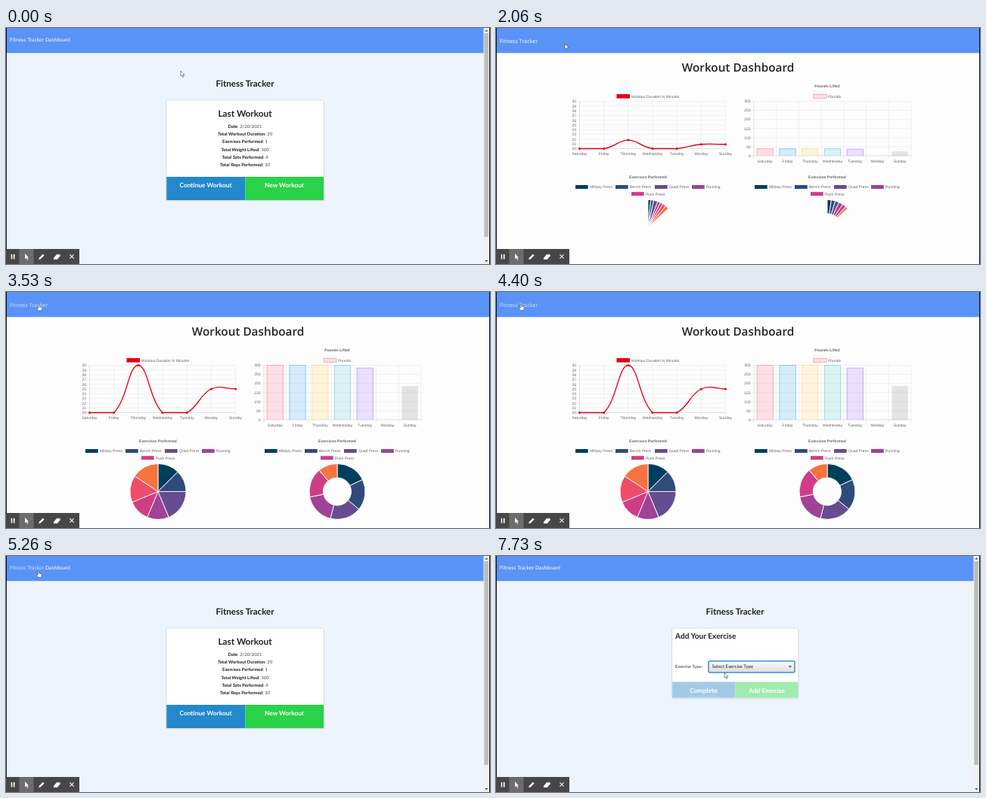
Animation of 640x314 px, one loop 8 s. Source, as an HTML page:

```html
<!DOCTYPE html>
<html lang="en">
<head>
<meta charset="utf-8">
<title>Fitness Tracker</title>
<style>
  html, body { margin: 0; height: 100%; overflow: hidden; background: #fdfdfd; }
  svg { display: block; width: 100vw; height: 100vh; }
  text { font-family: Lato, sans-serif; white-space: pre; text-rendering: geometricPrecision; }
  .b { font-weight: 700; }
  .chart text { font: 5px "Liberation Sans", Arial, sans-serif; fill: #666; }
  .chart .b { font-weight: 700; }
  .dash { font-family: "Open Sans", sans-serif; }
</style>
</head>
<body>
<svg id="stage" viewBox="0 0 640 314"></svg>
<script>
const LOOP = 8000;
const stage = document.getElementById('stage');

// ---------- markup helpers ----------
const rect = (x, y, w, h, fill, more = '') =>
  `<rect x="${x}" y="${y}" width="${w}" height="${h}" fill="${fill}" ${more}/>`;
const label = (x, y, str, more = '') => `<text x="${x}" y="${y}" ${more}>${str}</text>`;
const centered = (x, y, str, more = '') => label(x, y, str, `text-anchor="middle" ${more}`);
const path = (d, more = '') => `<path d="${d}" ${more}/>`;
const bold = (size, fill) => `class="b" font-size="${size}" fill="${fill}"`;

// ---------- charts ----------
const DAYS = ['Saturday', 'Friday', 'Thursday', 'Wednesday', 'Tuesday', 'Monday', 'Sunday'];
const MINUTES = [20, 20, 30, 20, 20, 25, 25];
const POUNDS = [300, 300, 300, 300, 285, 0, 185];
const SLICES = ['#003f5c', '#2f4b7c', '#664c90', '#a04295', '#d03d87', '#ee4d68', '#f7733f'];
const BARS = ['255,99,132', '54,162,235', '255,206,86', '75,192,192', '153,102,255', '255,159,64'];
const RED = '#e20010';
const LINE = { left: 110.5, step: 32.17, top: 97.5, base: 160.5 };
const BAR = { left: 341, step: 29.71, top: 97.5, base: 170, width: 21.4 };

const gridLine = (d, dark) =>
  path(d, `stroke="#000" stroke-opacity="${dark ? .22 : .1}" stroke-width=".5"`);

function grid({ left, step, top, base }, columns, rows, rowText) {
  const right = left + step * columns;
  let out = '';
  for (let i = 0; i <= columns; i++) out += gridLine(`M${left + i * step} ${top}V${base + 4}`, !i);
  for (let i = 0; i <= rows; i++) {
    const y = base - (base - top) * i / rows;
    out += gridLine(`M${left - 4} ${y}H${right}`, !i);
    out += label(left - 4.5, y + 1.8, rowText(i), 'text-anchor="end"');
  }
  return out;
}

function pieLegend(cx) {
  const items = [[-96, 0, 'Military Press'], [-43, 0, 'Bench Press'], [9, 0, 'Quad Press'],
                 [58, 0, 'Running'], [-22, 9.2, 'Push Press']];
  return centered(cx, 199.5, 'Exercises Performed', 'class="b"') +
    items.map(([x, y, name], i) =>
      rect(cx + x, 209 + y, 16.7, 5, SLICES[i]) + label(cx + x + 19, 213.3 + y, name)).join('');
}

const lineChart = rect(159.5, 88, 17.5, 5.6, RED) +
  label(179, 92.6, 'Workout Duration In Minutes') +
  grid(LINE, 6, 10, i => 20 + i) +
  DAYS.map((d, i) => centered(LINE.left + i * LINE.step, 169, d)).join('');

const barChart = centered(438, 78.6, 'Pounds Lifted', 'class="b"') +
  rect(420, 88.2, 17, 5.2, `rgba(${BARS[0]},.2)`, `stroke="rgb(${BARS[0]})" stroke-width=".5"`) +
  label(439, 92.6, 'Pounds') +
  grid(BAR, 7, 6, i => i * 50) +
  DAYS.map((d, i) => centered(BAR.left + (i + .5) * BAR.step, 178.5, d)).join('');

// Smooth line through the points, control points kept inside the chart area.
function linePlot(e) {
  const pts = MINUTES.map((v, i) =>
    [LINE.left + i * LINE.step, LINE.base - (v - 20) / 10 * (LINE.base - LINE.top)]);
  const show = ([x, y]) => {
    const inside = Math.min(LINE.base, Math.max(LINE.top, y));
    return `${x} ${LINE.base - (LINE.base - inside) * e}`;
  };
  const handles = pts.map((p, i) => {
    const a = pts[Math.max(i - 1, 0)], b = pts[Math.min(i + 1, 6)];
    const da = Math.hypot(p[0] - a[0], p[1] - a[1]), db = Math.hypot(b[0] - p[0], b[1] - p[1]);
    const at = k => [p[0] + k * (b[0] - a[0]), p[1] + k * (b[1] - a[1])];
    return [at(-.4 * da / (da + db)), at(.4 * db / (da + db))];
  });
  let d = 'M' + show(pts[0]);
  for (let i = 1; i < 7; i++)
    d += `C${show(handles[i - 1][1])} ${show(handles[i][0])} ${show(pts[i])}`;
  const dots = pts.map(p => `M${show(p)}h0`).join('');
  return path(d, `fill="none" stroke="${RED}" stroke-width="1.3"`) +
    path(dots, `stroke="${RED}" stroke-width="3" stroke-linecap="round"`);
}

function barPlot(e) {
  return POUNDS.map((v, i) => {
    const x = BAR.left + (i + .5) * BAR.step - BAR.width / 2;
    const top = BAR.base - (BAR.base - BAR.top) * v / 300 * e;
    const rgb = BARS[i];
    return v && path(`M${x} ${BAR.base}V${top}h${BAR.width}V${BAR.base}`,
      `fill="${rgb ? `rgba(${rgb},.2)` : 'rgba(0,0,0,.1)'}"
       stroke="${rgb ? `rgb(${rgb})` : 'none'}" stroke-width=".5"`) || '';
  }).join('');
}

function ringPlot(cx, inner, values, e) {
  const cy = 265.5, outer = 37, total = values.reduce((a, b) => a + b);
  const at = (r, a) => `${cx + r * Math.sin(a)} ${cy - r * Math.cos(a)}`;
  let angle = 0;
  return values.map((v, i) => {
    const a = angle, b = angle += v / total * 2 * Math.PI * e;
    return path(`M${at(inner, a)}L${at(outer, a)}A${outer} ${outer} 0 0 1 ${at(outer, b)}` +
      `L${at(inner, b)}A${inner} ${inner} 0 0 0 ${at(inner, a)}Z`,
      `fill="${SLICES[i]}" stroke="#fff" stroke-width=".9" stroke-linejoin="bevel"`);
  }).join('');
}

// ---------- pages ----------
const navBar = width => rect(0, 0, width, 33.3, '#5a93f8');
const shell = navBar(632) +
  '<text x="5" y="17.7" font-size="6.95" fill="#fff"><tspan id="brand">Fitness Tracker</tspan> <tspan id="dashLink">Dashboard</tspan></text>' +
  centered(316, 78.3, 'Fitness Tracker', bold(11.6, '#212121')) +
  rect(631.5, 0, 8.5, 314, '#f1f1f1') + rect(632.3, 7, 5.6, 271, '#bdbdbd') +
  path('M633.3 4.5h4l-2-2.5zM633.3 309h4l-2 2.5z', 'fill="#505050"');

const card = (x, w, h) =>
  rect(x - .3, 96, w + .6, h + .5, '#fff', 'rx="2" stroke="#cfd3d8" stroke-width=".7" filter="url(#soft)"');
const button = (x, y, w, h, fill, more = '') => rect(x, y, w, h, fill, more);

const stats = [['Date', '2/20/2021'], ['Total Workout Duration', 20], ['Exercises Performed', 1],
               ['Total Weight Lifted', 300], ['Total Sets Performed', 4], ['Total Reps Performed', 10]];
const homePage = card(212, 208, 132.5) +
  centered(316, 118.3, 'Last Workout', bold(11.8, '#212121')) +
  stats.map(([name, value], i) => centered(316, 133.2 + i * 10.1,
    `<tspan class="b" fill="#1c1c1c">${name}</tspan>: ${value}`, 'font-size="5.9" fill="#444"')).join('') +
  button(212.3, 198, 104, 31, '#2388cd', 'id="continue"') +
  button(316.3, 198, 103.7, 31, '#2ad149', 'id="fresh"') +
  centered(264, 211.8, 'Continue Workout', bold(8.35, '#fff')) +
  centered(368, 211.8, 'New Workout', bold(8.3, '#fff'));

const formPage = card(233, 166.5, 92.5) +
  label(237, 110, 'Add Your Exercise', bold(10.1, '#212121')) +
  label(237, 149.3, 'Exercise Type:', 'font-size="5.85" fill="#333"') +
  rect(281, 139.8, 114, 15.2, 'url(#face)', 'id="select" rx="2" stroke="#aaa" stroke-width=".8"') +
  label(285.5, 149.2, 'Select Exercise Type', 'font-size="6.2" fill="#222"') +
  path('M386.6 146h4.6l-2.3 2.8z', 'fill="#2a7fb8"') +
  button(233.2, 167.5, 83.3, 21, '#a2cae7') + button(316.5, 167.5, 83, 21, '#a0ebae') +
  centered(274.5, 181.6, 'Complete', bold(8.5, '#fff')) +
  centered(358, 181.6, 'Add Exercise', bold(8.4, '#fff'));

const dashPage = navBar(640) +
  label(5, 19.6, 'Fitness Tracker', 'id="dashBrand" class="dash" font-size="7.3" fill="#fff"') +
  centered(320, 58.3, 'Workout Dashboard',
    'class="dash" font-size="15.3" font-weight="600" fill="#212529"') +
  `<g id="charts" class="chart">${lineChart}${barChart}${pieLegend(201)}${pieLegend(438)}<g id="plots"></g></g>`;

const toolbar = rect(0, 294, 97, 20, '#474747') + rect(17.5, 294, 19, 20, '#6c6c6c') +
  path('M7.5 301v6.5M10.7 301v6.5', 'stroke="#fff" stroke-width="1.6"') +
  path('M25 300v7.5l1.8-1.7 1.4 3 1.1-.5-1.4-2.9h2.3z', 'fill="#fff"') +
  path('M43.3 308l.6-2.3 5-5 1.7 1.7-5 5z', 'fill="#fff"') +
  path('M63 306l4-4.8h4.6v2.2l-4 4.6H63z', 'fill="#fff"') +
  path('M84.4 301.4l5.2 5.2m0-5.2l-5.2 5.2', 'stroke="#fff" stroke-width="1.1"');

const pointer = path('M0 0V7.2L1.7 5.7 2.9 8.3 4 7.8 2.9 5.3H5.1Z',
    'id="arrow" fill="#fff" stroke="#333" stroke-width=".55" stroke-linejoin="round"') +
  path('M-.8 .6Q0 -.6 .8 .6V3.2L3.5 3.8Q4.3 4 4.2 5L3.6 8.3H-.7L-2.8 5.4Q-2.8 4.3 -1.7 4.8L-.8 5.5Z',
    'id="hand" fill="#fff" stroke="#333" stroke-width=".5" stroke-linejoin="round"');

stage.innerHTML = `
  <defs>
    <filter id="soft" x="-5%" y="-5%" width="110%" height="112%">
      <feDropShadow dx="0" dy=".5" stdDeviation=".7" flood-opacity=".2"/>
    </filter>
    <linearGradient id="face" x2="0" y2="1">
      <stop stop-color="#fcfcfc"/><stop offset="1" stop-color="#dcdcdc"/>
    </linearGradient>
  </defs>
  <g id="app">${rect(0, 0, 640, 314, '#edf4fd')}${shell}
    <g id="home">${homePage}</g><g id="form">${formPage}</g></g>
  <g id="dashboard">${rect(0, 0, 640, 314, '#fdfdfd')}${dashPage}</g>
  ${rect(0, 0, 1, 314, '#111')}${rect(639, 0, 1, 314, '#111')}${toolbar}
  <circle id="ring" r="14" fill="none" stroke="#c01f45" stroke-width="1.1"/>
  <g id="cursor">${pointer}</g>`;

// ---------- timeline ----------
const $ = id => document.getElementById(id);
const show = (id, on) => $(id).setAttribute('display', on ? 'inline' : 'none');
const paint = (id, fill) => $(id).setAttribute('fill', fill);
const between = (t, a, b) => t >= a && t < b;

const TRAIL = [[0, 231, 57], [60, 231, 57], [860, 84, 20], [1260, 75, 16], [1730, 76, 16],
  [2060, 91, 21], [2600, 97, 19], [2960, 97, 19], [3730, 33, 16], [4860, 33, 16], [5260, 43, 20],
  [5660, 130, 98], [6080, 253, 209], [6460, 254, 208], [6900, 300, 153], [7660, 301, 153],
  [7730, 302, 155], [LOOP, 302, 155]];
const CLICKS = [[1330, 1600], [4130, 4330], [6130, 6400], [6960, 7160]];

function cursorAt(t) {
  const i = TRAIL.findIndex(k => k[0] > t);
  const [t0, x0, y0] = TRAIL[i - 1], [t1, x1, y1] = TRAIL[i];
  const p = (t - t0) / (t1 - t0), s = p * p * (3 - 2 * p);
  return [x0 + (x1 - x0) * s, y0 + (y1 - y0) * s];
}

const grow = (t, start) => 1 - (1 - Math.min(1, Math.max(0, (t - start) / 1000))) ** 4;

function draw(t) {
  const page = between(t, 1870, 4560) ? 'dashboard' : t < 6460 ? 'home' : 'form';
  const onDash = page === 'dashboard', onHome = page === 'home';
  const [x, y] = cursorAt(t);
  const clicking = CLICKS.some(([a, b]) => between(t, a, b));

  show('dashboard', onDash);
  show('app', !onDash);
  show('home', onHome);
  show('form', page === 'form');

  const over = (l, r, top, bottom) => between(x, l, r) && between(y, top, bottom);
  const onBrand = over(4, onDash ? 58 : 50, 10, 21);
  const onLink = !onDash && over(50, 86, 10, 21);
  const onContinue = onHome && over(212, 316, 198, 229);
  const onNew = onHome && over(316, 420, 198, 229);
  const linkFill = hover => hover ? '#cfdffc' : '#fff';
  paint('brand', linkFill(onBrand));
  paint('dashBrand', linkFill(onBrand));
  paint('dashLink', linkFill(onLink));
  paint('continue', !onContinue ? '#2388cd' : clicking ? '#1b69a2' : '#1678c2');

  const select = $('select'), focused = t >= 6960;
  select.setAttribute('stroke', focused ? '#3b8fe0' : '#aaa');
  select.setAttribute('stroke-width', focused ? 1.5 : .8);

  show('charts', t >= 2010);
  if (onDash) {
    const e = grow(t, 2027);
    $('plots').innerHTML = linePlot(grow(t, 2012)) + barPlot(e) +
      ringPlot(201, 0, MINUTES, e) + ringPlot(438, 18.5, POUNDS, e);
  }

  const hand = onBrand || onLink || onContinue || onNew;
  show('hand', hand);
  show('arrow', !hand);
  $('cursor').setAttribute('transform', `translate(${x} ${y})`);
  show('ring', clicking);
  $('ring').setAttribute('transform', `translate(${x} ${y + .7})`);
}

function tick() {
  draw(performance.now() % LOOP);
  requestAnimationFrame(tick);
}
tick();
</script>
</body>
</html>
```
